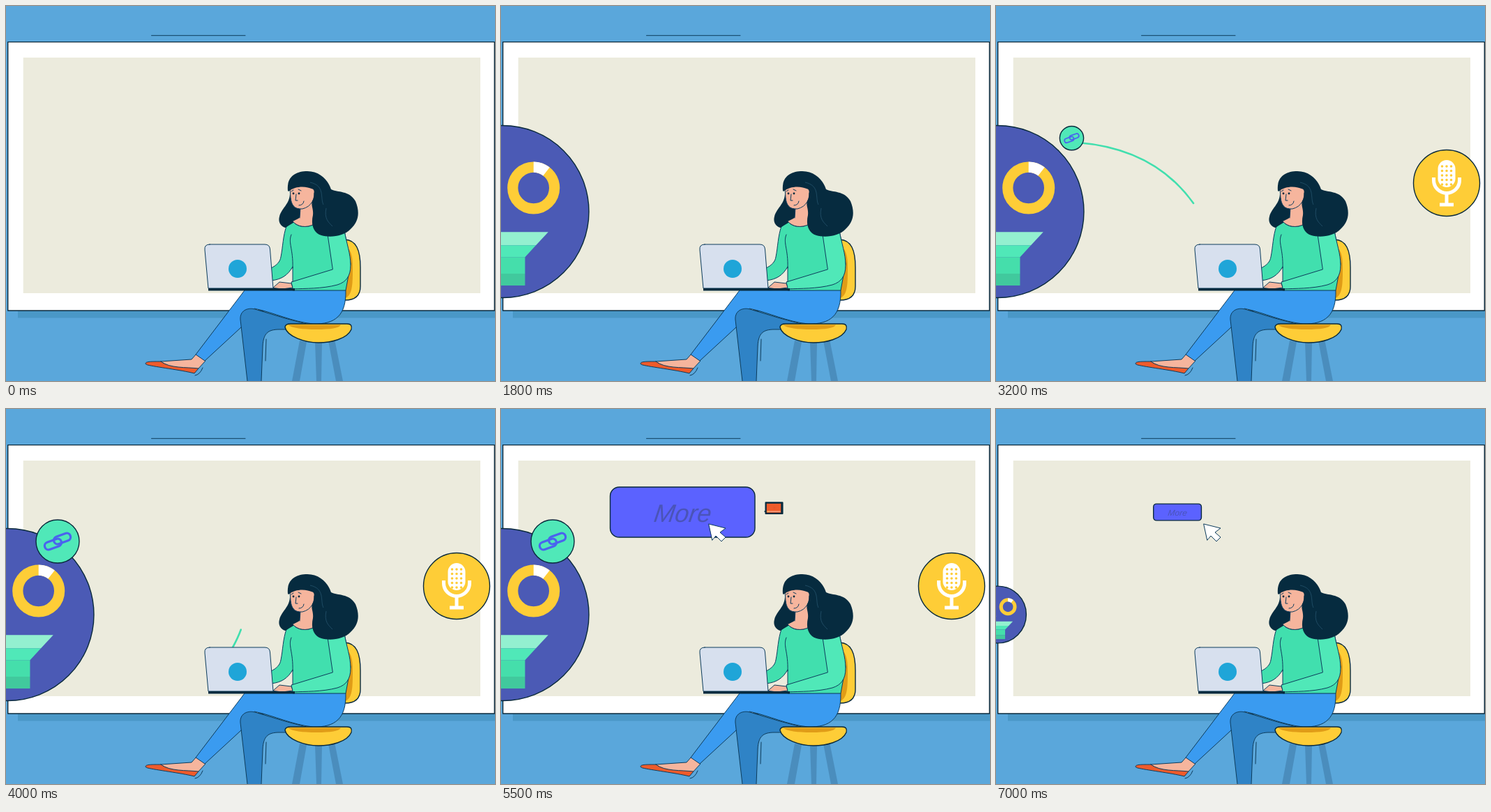
An HTML page that plays this animation: 701 px wide and 538 px high, repeating every 7200 ms.

```html
<!DOCTYPE html>
<html lang="en">
<head>
<meta charset="utf-8">
<title>Presentation</title>
<style>
  html, body { margin: 0; width: 100%; height: 100%; overflow: hidden; background: #5aa7db; }
  svg { display: block; width: 701px; height: 538px; }
  .ink { stroke: #0a2a3c; stroke-width: 1.4; stroke-linejoin: round; stroke-linecap: round; vector-effect: non-scaling-stroke; }
  .thin { stroke: #0d3c5c; stroke-width: 1; stroke-linejoin: round; stroke-linecap: round; }
  .line { fill: none; }
  .trail { fill: none; stroke: #41dfae; stroke-width: 2.6; stroke-linecap: round; }
  .skin { fill: #f6b59d; }
  .hair { fill: #062b3f; }
</style>
</head>
<body>
<svg viewBox="0 0 701 538">
  <rect width="701" height="538" fill="#5aa7db"/>
  <path class="thin" d="M208.500 42.300H343"/>
  <rect x="17" y="437" width="684" height="10.500" fill="#4a98c7"/>
  <rect class="ink" x="2.700" y="51.600" width="697.600" height="385.400" fill="#fff"/>
  <rect x="24.700" y="74" width="655.300" height="338" fill="#ecebdd"/>

  <path class="trail" id="trail0" pathLength="1" d="M318 342Q268 272 218 272"/>
  <path class="trail" id="trail1" pathLength="1" d="M330 400Q340 262 386 227C418 203 466 197 515 205"/>
  <path class="trail" id="trail2" pathLength="1" d="M318 352Q268 208 118 196"/>
  <path class="trail" id="trail3" pathLength="1" d="M325 342Q336 322 340 306Q352 250 310 195"/>

  <!-- Each moving item is drawn around its own pivot -->
  <g id="report">
    <circle class="ink" r="123.500" fill="#4b5ab5"/>
    <g transform="scale(1.36) translate(-116 -256.5)">
      <path fill="#8b8df6" d="M62 201h6.500v57H62zM74 216h6.500v42H74zM86.500 207H93v51h-6.500zM98.500 230h6.500v28h-6.500z"/>
      <path stroke="#8b8df6" d="M56 261.500h56"/>
      <circle cx="148.500" cy="231.500" r="22" fill="none" stroke="#fecd37" stroke-width="11.200"/>
      <path d="M148.500 209.500A22 22 0 0 1 162 214.200" fill="none" stroke="#fff" stroke-width="11.200"/>
      <path fill="#93f0d0" d="M78 278h86l-13 14H91z"/>
      <path fill="#50e8b8" d="M91 292h60l-11.500 12.500H102z"/>
      <path fill="#45deab" d="M102 304.500h37.500V322H102z"/>
      <path fill="#41c99d" d="M102 322h37.500v12.500H102z"/>
    </g>
  </g>

  <g id="mic">
    <circle class="ink" r="47.500" fill="#fecd37"/>
    <g fill="none" stroke="#fff" stroke-width="5">
      <rect x="-12.500" y="-33" width="25" height="39" rx="12.500" fill="#fff" stroke="none"/>
      <path d="M-18.500 -8V-4A18.500 18.500 0 0 0 18.500 -4V-8M0 15V30M-10 31H10"/>
    </g>
    <path d="M-6.500 -24V4M0 -24V4M6.500 -24V4" stroke="#fecd37" stroke-width="3.600" stroke-linecap="round" stroke-dasharray="0 6.500"/>
  </g>

  <g id="link">
    <circle class="ink" r="31" fill="#50e8b8"/>
    <g transform="rotate(-20)" fill="none" stroke="#4a63ee" stroke-width="3.200">
      <rect x="-20" y="-4" width="25" height="11" rx="5.500"/>
      <rect x="-5" y="-7" width="25" height="11" rx="5.500"/>
    </g>
  </g>

  <g id="button">
    <rect class="ink" x="-103.500" y="-36" width="207.500" height="72" rx="13" fill="#5b62ff"/>
    <text transform="skewX(-8)" x="1" y="14" text-anchor="middle" font-family="'Liberation Sans', Arial, sans-serif" font-style="italic" font-size="36" fill="#4a54b8">More</text>
  </g>

  <g id="video">
    <path class="hair" d="M0 0L17 -13V-146Q17 -157 28 -157H302Q313 -157 313 -146V35Q313 46.500 302 46.500H28Q17 46.500 17 35V12Z"/>
    <rect x="43" y="-128" width="233" height="148" fill="#f05c2b"/>
    <circle cx="168" cy="-60" r="23.500" fill="none" stroke="#c9502f" stroke-width="1.200"/>
    <path fill="#d0502d" d="M162 -69L181 -60L162 -50Z"/>
    <g stroke-width="7.500" stroke-linecap="round">
      <path stroke="#fff" d="M54 .5H265"/>
      <path stroke="#fecd37" d="M54 .5H92"/>
    </g>
    <path stroke="#062b3f" stroke-width="1.500" d="M96 -7V8"/>
  </g>

  <path id="cursor" class="thin" fill="#fff" d="M0 0L24 6L16 12L24 19L18 25L10 17L5 23Z"/>

  <!-- Chair -->
  <path fill="#4a8dbd" d="M421 480L410 538H421L431 482ZM443 482L445 538H452L453 482ZM462 480L473 538H483L471 478Z"/>
  <path class="ink" fill="#fecd37" d="M486 335C502 336 508 350 508 375V402C508 416 500 422 486 422Z"/>
  <path fill="#e09c17" d="M486 345C497 349 497 365 497 382C497 404 495 416 486 419Z"/>

  <!-- Legs -->
  <path class="skin thin" d="M222 510L266 507L273 499L286 509L275 521C255 520 235 521 222 510Z"/>
  <path class="thin" fill="#ee5b2b" d="M200 513C200 510 206 510 222 510C235 520 258 518 276 520L270 527C250 522 215 518 203 515Z"/>
  <path class="thin line" d="M271 530Q278 529 282 519"/>
  <path class="thin" fill="#3a9bf0" d="M342 408L272 500L285 509L337 461L356 434C385 440 410 453 440 456C472 457 488 444 487 408Z"/>
  <path class="thin" fill="#2f83c6" d="M346 538L336 450C335 438 345 432 357 435L400 448L430 456L410 464H392C375 464 369 470 368 488L366 538"/>
  <path class="thin" d="M373 478L372 509"/>
  <path class="ink" fill="#fecd37" d="M400 461C400 457 403 456 408 456H489C495 456 496 459 495 464C489 478 465 483 448 483C428 483 403 474 400 461Z"/>
  <path fill="#e09c17" d="M404 457.500H480C478 462 465 464 445 464C425 464 410 462 404 457.500Z"/>

  <!-- Torso and arms -->
  <path class="thin" fill="#41dfae" d="M402 316L411 309C418 318 432 318 440 314L485 322L494 370L487 408H411V374C404 386 396 392 380 394V376C388 372 393 367 394 360C397 345 397 330 402 316Z"/>
  <path class="thin line" d="M409 328C404 340 412 348 411 376"/>
  <path class="thin" fill="#50e8b8" d="M461 325L485 322C488 340 494 355 494 372C494 387 488 396 475 400C452 406 430 405 411 406L409 396L468 378Z"/>
  <path class="skin thin" d="M383 404L392 396L409 398L411 404L396 406Z"/>

  <!-- Head -->
  <path class="hair" d="M407 270C406 285 395 290 392 302C389 313 398 318 401 318C410 311 426 307 426 288Z"/>
  <path class="skin" d="M422 288L443 280V313C430 319 418 317 411 309L421 304Z"/>
  <path class="thin line" d="M411 309C418 317 430 319 442 313M422 290L421 304"/>
  <path class="skin thin" d="M407 259C412 250 434 248 442 262C444 276 438 288 425 291C413 292 409 285 408 275Z"/>
  <path class="hair" d="M404 265C402 245 415 237 432 237C450 237 462 250 466 263C475 268 492 264 501 280C508 297 505 310 494 320C485 330 465 333 452 329C440 325 437 313 440 300C441 290 437 287 439 280C442 275 442 268 440 263C430 258 415 258 405 266Z"/>
  <path class="line" stroke="#25546c" stroke-width=".8" d="M436 253C458 258 450 275 455 285M459 290C456 305 462 310 468 316"/>
  <path class="skin" d="M435 264C441 259 445 268 438 272Z"/>
  <g class="hair"><circle cx="412" cy="269" r="1.400"/><circle cx="420" cy="269" r="1.400"/></g>
  <path class="thin line" d="M409 266L412 264M419 263L423 265M416 270L415 279L418 279M420 286Q426 286 427 280"/>

  <!-- Laptop -->
  <path class="thin" fill="#d7e0ee" d="M292 342H371Q378 342 378.500 349L383 405H290L285 350Q284 342 292 342Z"/>
  <path class="hair" d="M290 405H414V408.500H290Z"/>
  <circle cx="332" cy="377" r="13" fill="#1fa5d8"/>
</svg>

<script>
  const LOOP = 7200, STEP = 100;
  const $ = id => document.getElementById(id);
  const span = (t, from, to) => Math.min(1, Math.max(0, (t - from) / (to - from)));
  const smooth = p => p * p * (3 - 2 * p);
  const easeOut = p => 1 - (1 - p) ** 1.8;
  const backIn = p => 2.7 * p ** 3 - 1.7 * p ** 2;
  const shrink = (t, from) => 1 - backIn(span(t, from, from + 700));
  const bezier = (a, b, c, p) => (1 - p) ** 2 * a + 2 * p * (1 - p) * b + p * p * c;

  // Bubbles leave the end of their trail on a curve: start, control, rest
  const bubbles = [
    { id: 'report', start: 740, leave: 6355, x: [218, 77, 2.5], y: [272, 232, 295] },
    { id: 'mic', start: 1987, leave: 6200, x: [515, 561, 646], y: [205, 189, 254] },
    { id: 'link', start: 2720, leave: 6200, x: [118, 96, 74], y: [196, 178, 190] }
  ];

  function place(id, x, y, scale) {
    $(id).setAttribute('transform', `translate(${x} ${y}) scale(${scale})`);
    $(id).style.display = scale > 0.002 ? '' : 'none';
  }

  function drawTrail(index, head, tail) {
    const style = $('trail' + index).style;
    style.display = head > tail ? '' : 'none';
    style.strokeDasharray = `${head - tail} 2`;
    style.strokeDashoffset = -tail;
  }

  function draw(t) {
    bubbles.forEach(({ id, start, leave, x, y }, i) => {
      const since = t - start, q = smooth(span(since, 300, 900));
      const size = easeOut(span(since, 300, 800)) * shrink(t, leave);
      place(id, bezier(...x, q), bezier(...y, q), size);
      drawTrail(i, smooth(span(since, -150, 350)), smooth(span(since, 250, 900)));
    });
    drawTrail(3, smooth(span(t, 3800, 4550)), smooth(span(t, 4250, 4850)));

    place('button', 260, 148, easeOut(span(t, 4650, 5200)) * shrink(t, 6355));
    place('video', 377, 147, easeOut(span(t, 5473, 6000)) * shrink(t, 6200) / 1.026);

    const c = smooth(span(t, 4900, 5400));
    place('cursor', 370 - 72 * c, 240 - 75 * c, t > 4900 ? 1 : 0);
  }

  function frame() {
    draw(Math.floor(performance.now() % LOOP / STEP) * STEP);
    requestAnimationFrame(frame);
  }
  frame();
</script>
</body>
</html>
```
